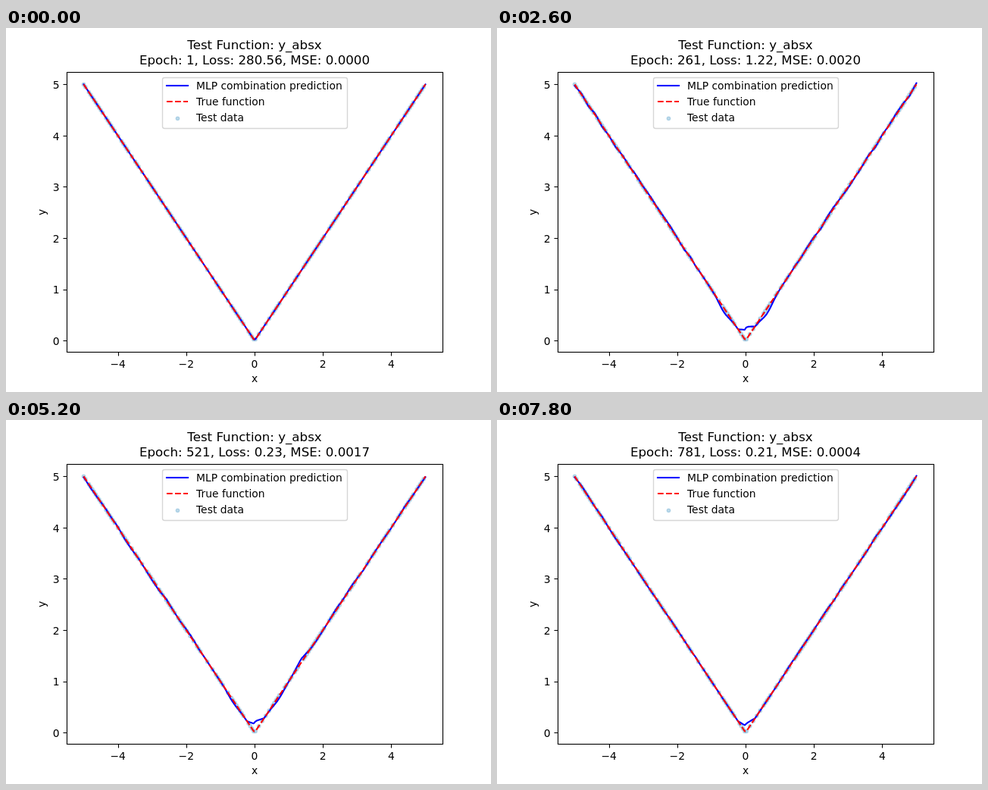
These frames come from a looping animation (640x480 px, 8000 ms). An HTML page:

```html
<!DOCTYPE html>
<html lang="en">
<head>
<meta charset="utf-8">
<title>Fit of y_absx</title>
<style>
  html, body { margin: 0; width: 100%; height: 100%; overflow: hidden; background: #fff; }
  svg { display: block; width: 640px; height: 480px; }
  text { font: 13.89px "DejaVu Sans", sans-serif; fill: #000; }
  .title { font-size: 16.67px; }
  .mid { text-anchor: middle; }
  .end { text-anchor: end; }
  .axis { fill: none; stroke: #000; stroke-width: 1.11; }
  .line { fill: none; stroke-width: 2.083; stroke-linejoin: round; }
  .prediction { stroke: #00f; stroke-linecap: square; }
  .truth { stroke: #f00; stroke-dasharray: 7.71 3.33; }
  .dot { fill: #7fb8d8; stroke: #7fb8d8; stroke-width: 1.39; fill-opacity: .5; stroke-opacity: .5; }
</style>
</head>
<body>
<svg viewBox="0 0 640 480">
  <defs><clipPath id="plot"><rect x="80" y="57.6" width="496" height="369.6"/></clipPath></defs>
  <g clip-path="url(#plot)">
    <g id="dots"></g>
    <path id="prediction" class="line prediction"/>
    <path id="truth" class="line truth"/>
  </g>
  <g id="ticks"></g>
  <rect class="axis" x="80.5" y="58.5" width="496" height="369"/>
  <text class="mid" x="328" y="467">x</text>
  <text class="mid" transform="translate(52 243) rotate(-90)">y</text>
  <text class="title mid" x="328" y="28">Test Function: y_absx</text>
  <text class="title mid" x="328" y="48" id="status"></text>
  <rect x="206.5" y="65.5" width="244" height="67" rx="2.8" fill="#fff" stroke="#ccc" stroke-width="1.39" opacity=".8"/>
  <path class="line prediction" d="M212 76H240"/>
  <path class="line truth" d="M212 97H240"/>
  <circle class="dot" cx="226.5" cy="119.3" r="2.2"/>
  <text x="251" y="81">MLP combination prediction</text>
  <text x="251" y="102">True function</text>
  <text x="251" y="123">Test data</text>
</svg>
<script>
const STEP = 200, STEPS = 40, SAMPLES = 200;
const byId = id => document.getElementById(id);
const px = x => 328 + 45.09 * x;
const py = y => 412.1 - 67.54 * y;
const lerp = (a, b, u) => a + (b - a) * u;
const tent = (d, width) => Math.max(0, 1 - Math.abs(d) / width);
const bell = (d, width) => Math.exp(-d * d / (width * width));
const sampleX = i => -5 + i * 10 / (SAMPLES - 1);

function random(seed) {
  return () => {
    seed = (seed + 0x6D2B79F5) | 0;
    let v = Math.imul(seed ^ (seed >>> 15), 1 | seed);
    v = (v + Math.imul(v ^ (v >>> 7), 61 | v)) ^ v;
    return ((v ^ (v >>> 14)) >>> 0) / 4294967296;
  };
}

const milestones = [
  { step: 0, loss: 280.56, mse: 0 },
  { step: 8, loss: 3.18, mse: .0027 },
  { step: 13, loss: 1.22, mse: .002 },
  { step: 23, loss: .19, mse: .0018 },
  { step: 29, loss: .29, mse: .0017 },
  { step: 34, loss: .12, mse: .0011 },
  { step: 39, loss: .21, mse: .0004 }
];

function metrics(step) {
  const i = Math.max(1, milestones.findIndex(m => m.step >= step));
  const a = milestones[i - 1], b = milestones[i];
  const u = (step - a.step) / (b.step - a.step);
  return { loss: a.loss * Math.pow(b.loss / a.loss, u), mse: lerp(a.mse, b.mse, u) };
}

// Blunt tip with a dip on each side, sharpening as training goes on
function cornerError(step, x) {
  const left = 1 - step / STEPS;
  return (.28 - .0033 * step) * tent(x - .03, .25)
    - .12 * left * bell(x + .63, .2)
    - .15 * left * bell(x - .55 - .006 * step, .22)
    + .08 * bell(step - 29, 8) * bell(x - 1.38, .2);
}

function wiggle(step) {
  const rand = random(step + 40);
  const size = .035 * (1 - .5 * step / STEPS);
  const values = Array.from({ length: 52 }, () => (rand() * 2 - 1) * size);
  return x => {
    const cell = (x + 5) * 5, n = Math.floor(cell);
    return Math.abs(x) > 1.4 ? lerp(values[n], values[n + 1], cell - n) : 0;
  };
}

const toPath = points => "M" + points.map(([x, y]) => px(x).toFixed(2) + " " + py(y).toFixed(2)).join("L");

function draw(step) {
  const strength = Math.min(1, Math.sqrt(step / 8));
  const noise = wiggle(step);
  const points = Array.from({ length: SAMPLES }, (_, i) => {
    const x = sampleX(i);
    return [x, Math.abs(x) + strength * (cornerError(step, x) + noise(x))];
  });
  byId("prediction").setAttribute("d", toPath(points));
  const { loss, mse } = metrics(step);
  byId("status").textContent = `Epoch: ${1 + 20 * step}, Loss: ${loss.toFixed(2)}, MSE: ${mse.toFixed(4)}`;
}

function buildAxes() {
  let ticks = "", dots = "";
  const label = v => String(v).replace("-", "\u2212");
  const snap = v => Math.round(v) + .5;
  for (let v = -4; v <= 4; v += 2)
    ticks += `<path class="axis" d="M${snap(px(v))} 427.5v5"/><text class="mid" x="${px(v)}" y="448">${label(v)}</text>`;
  for (let v = 0; v <= 5; v++)
    ticks += `<path class="axis" d="M80.5 ${snap(py(v))}h-5"/><text class="end" x="70.5" y="${Math.round(py(v) + 5.7)}">${v}</text>`;
  const rand = random(7);
  for (let i = 0; i < SAMPLES; i++) {
    const x = sampleX(i);
    if (rand() < .75) dots += `<circle class="dot" cx="${px(x)}" cy="${py(Math.abs(x))}" r="2.2"/>`;
  }
  byId("ticks").innerHTML = ticks;
  byId("dots").innerHTML = dots;
  byId("truth").setAttribute("d", toPath([[-5, 5], [-.025, .025], [.025, .025], [5, 5]]));
}

let shown = -1;
function tick() {
  const step = Math.floor(performance.now() / STEP) % STEPS;
  if (step !== shown) draw(shown = step);
  requestAnimationFrame(tick);
}

buildAxes();
tick();
</script>
</body>
</html>
```
